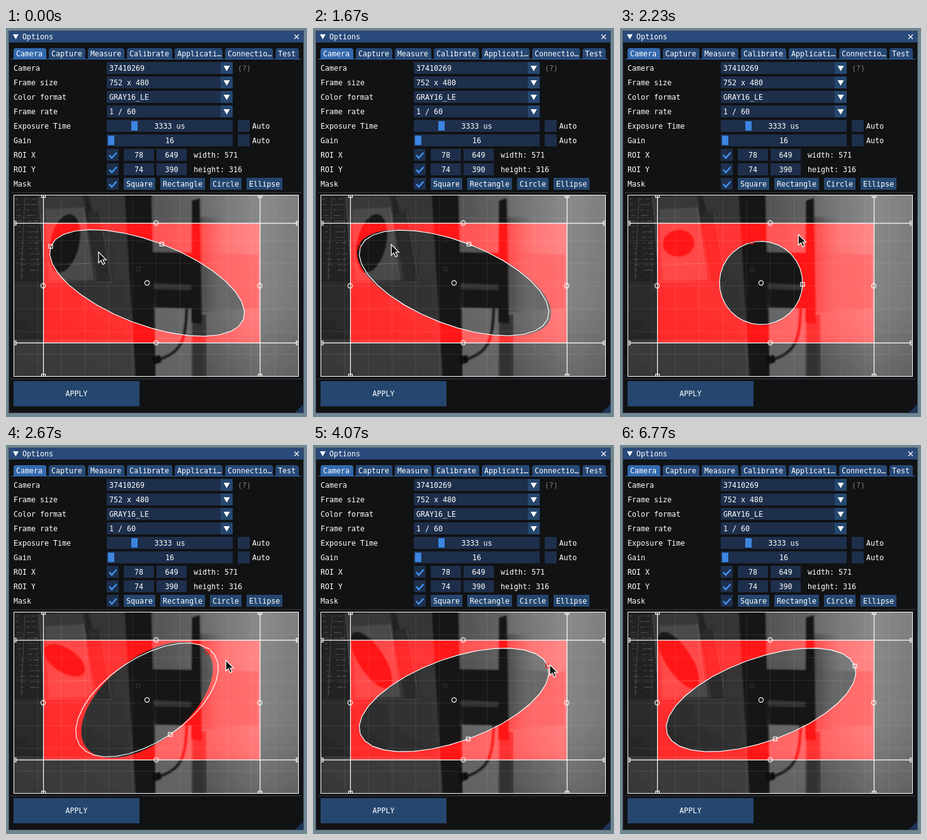
Recreate the animation shown at these times as an HTML page. Size 478x618 px, loop 6.81 s.

```html
<!DOCTYPE html>
<html lang="en">
<head>
<meta charset="utf-8">
<title>Options</title>
<style>
html, body { margin: 0; width: 100%; height: 100%; overflow: hidden; background: #6f8793; }
svg { display: block; }
text { font: 11.63px "DejaVu Sans Mono", "Liberation Mono", monospace; fill: #fff; white-space: pre; }
</style>
</head>
<body>
<svg id="stage" width="478" height="618" viewBox="0 0 478 618">
  <defs>
    <clipPath id="view"><rect x="13" y="266" width="451" height="287"/></clipPath>
    <filter id="soft" x="-5%" y="-5%" width="110%" height="110%"><feGaussianBlur stdDeviation="1.1"/></filter>
    <linearGradient id="wall">
      <stop offset="0" stop-color="#2c2c2c"/><stop offset=".4" stop-color="#373737"/>
      <stop offset=".49" stop-color="#555"/><stop offset=".64" stop-color="#646464"/>
      <stop offset=".67" stop-color="#707070"/><stop offset=".85" stop-color="#8c8c8c"/>
      <stop offset="1" stop-color="#7c7c7c"/>
    </linearGradient>
    <linearGradient id="shade" x2="0" y2="1">
      <stop offset="0" stop-opacity="0"/><stop offset=".6" stop-opacity=".06"/><stop offset="1" stop-opacity=".25"/>
    </linearGradient>
    <linearGradient id="shadow">
      <stop offset="0" stop-color="#3c3c3c"/><stop offset="1" stop-color="#6e6e6e" stop-opacity=".4"/>
    </linearGradient>
  </defs>
  <g id="ui"></g>
  <g id="camera" clip-path="url(#view)" style="isolation:isolate">
    <g id="photo" filter="url(#soft)"></g>
    <g id="details"></g>
    <path id="tint" fill="#f00" fill-rule="evenodd" style="mix-blend-mode:screen"/>
    <g id="guides" fill="none" stroke="#fff"></g>
    <path id="outline" fill="none" stroke="#fff" stroke-width="1.2"/>
    <g id="handles" fill="none" stroke="#fff" stroke-width="1.2"></g>
  </g>
  <path id="cursor" d="M0 0V17L4 13.2L6.8 19.6L9.8 18.3L7 12.2H12.2Z" fill="#111" stroke="#fff" stroke-width="1.2"/>
</svg>
<script>
const $ = id => document.getElementById(id);

function add(parent, tag, attrs) {
  const node = document.createElementNS("http://www.w3.org/2000/svg", tag);
  for (const key in attrs) node.setAttribute(key, attrs[key]);
  parent.appendChild(node);
  return node;
}

const ui = $("ui");
const FRAME = "#1d2f4b", BUTTON = "#25476f", ACCENT = "#4296fa";
const ROI = { left: 59.5, right: 403.5, top: 310.1, bottom: 500.4 };

const rect = (x, y, width, height, fill, parent = ui) => add(parent, "rect", { x, y, width, height, fill });
const path = (d, attrs, parent = ui) => add(parent, "path", { d, ...attrs });

function label(value, x, y, attrs = {}) {
  add(ui, "text", { x, y: y + 4, ...attrs }).textContent = value;
}
const centered = (value, x, y) => label(value, x, y, { "text-anchor": "middle" });

function button(value, x, y, width, height, fill = BUTTON) {
  rect(x, y - Math.ceil(height / 2), width, height, fill);
  centered(value, x + width / 2, y);
}

function checkbox(x, y, checked) {
  rect(x, y - 10, 19, 19, FRAME);
  if (checked) path(`M${x + 4} ${y}l4 4.5l7.5-8.5`, { fill: "none", stroke: ACCENT, "stroke-width": 2.4 });
}

function slider(value, y, grabX, grabWidth) {
  button(value, 160, y, 200, 19, FRAME);
  rect(grabX, y - 8, grabWidth, 15, "#3d85e0");
  checkbox(368, y, false);
  label("Auto", 391, y);
}

function buildPanel() {
  rect(4, 4, 469, 608, "#434a55");
  rect(5, 5, 467, 606, "#111214");
  rect(5, 5, 467, 18, "#294a7a");
  path("M11 10h9l-4.5 8z", { fill: "#fff" });
  label("Options", 26, 14);
  path("M458 10.5l7 7m0-7l-7 7", { stroke: "#fff", "stroke-width": 1.2 });

  const tabs = [["Camera", 12, 52], ["Capture", 68, 58], ["Measure", 130, 58], ["Calibrate", 192, 72],
    ["Applicati…", 268, 76], ["Connectio…", 348, 76], ["Test", 428, 37]];
  tabs.forEach(([name, x, w], i) => {
    path(`M${x} 49v-13q0-4 4-4h${w - 8}q4 0 4 4v13z`, { fill: i ? "#264875" : "#3369ad" });
    label(name, x + 4, 41);
  });
  rect(8, 49, 461, 1, "#3369ad");

  const rowY = i => 64 + 23 * i;
  ["Camera", "Frame size", "Color format", "Frame rate", "Exposure Time", "Gain", "ROI X", "ROI Y", "Mask"]
    .forEach((name, i) => label(name, 12, rowY(i)));
  ["37410269", "752 x 480", "GRAY16_LE", "1 / 60"].forEach((value, i) => {
    const y = rowY(i);
    rect(160, y - 10, 181, 19, FRAME);
    rect(341, y - 10, 19, 19, BUTTON);
    path(`M345.5 ${y - 4}h10l-5 8.5z`, { fill: "#fff" });
    label(value, 164, y);
  });
  label("(?)", 368, 64, { style: "fill:#808080" });

  slider("3333 us", rowY(4), 199, 10);
  slider("16", rowY(5), 162, 10);
  [["78", "649", "width: 571"], ["74", "390", "height: 316"]].forEach(([from, to, size], i) => {
    const y = rowY(6 + i);
    checkbox(160, y, true);
    button(from, 187, y, 48, 19, FRAME);
    button(to, 239, y, 48, 19, FRAME);
    label(size, 298, y);
  });
  checkbox(160, rowY(8), true);
  [["Square", 187, 50], ["Rectangle", 245, 71], ["Circle", 324, 50], ["Ellipse", 382, 57]]
    .forEach(([name, x, w]) => button(name, x, rowY(8), w, 19));

  rect(8, 261, 461, 1, "#3c3c44");
  rect(8, 557, 461, 1, "#3c3c44");
  rect(12, 265, 453, 289, "#fff");
  button("APPLY", 12, 581, 200, 40);
  path("M472 598v13h-13z", { fill: "#1c3558" });
}

function buildPhoto() {
  const photo = $("photo"), details = $("details");
  const shape = (d, fill, opacity = 1) => path(d, { fill, opacity }, photo);
  rect(5, 258, 470, 303, "url(#wall)", photo);
  rect(5, 258, 470, 303, "url(#shade)", photo);
  shape("M5 495H206V561H5Z", "#484848", .6);

  // Monitor on the left, seen at an angle
  shape("M5 258H128L170 405L5 403Z", "#222");
  shape("M52 268L122 266L145 402L62 404Z", "#383838");
  shape("M62 288L123 285L137 400L68 402Z", "#484848");
  shape("M130 294L150 292L170 405L146 405Z", "#2a2a2a");

  // Frame post, bracket, rail and cable
  shape("M188 258H231L238 561H206Z", "#181818");
  shape("M238 446H294V561H238Z", "#707070", .7);
  shape("M310 357L400 360V446L318 450Z", "#626262", .6);
  shape("M309 300H345V452H309Z", "url(#shadow)", .7);
  shape("M232 356L297 357V446L236 444Z", "#161616");
  shape("M234 405L297 408V417L235 415Z", "#303030");
  shape("M296 455H318V561H296Z", "#2c2c2c", .85);
  shape("M295 274L308 270L311 470L294 468Z", "#161616");
  path("M287 446C285 500 278 515 240 528", { fill: "none", stroke: "#1c1c1c", "stroke-width": 5 }, photo);
  shape("M231 522l14-3l2 12l-13 5z", "#101010");

  let seed = 7;
  const random = () => (seed = seed * 16807 % 2147483647) / 2147483647;
  for (let i = 0; i < 44; i++) {
    const column = i % 3, y = 272 + Math.floor(i / 3) * 8.7;
    const x = [15, 31, 40][column] + (y - 270) * .07;
    path(`M${x} ${y}l${3 + random() * 6} -.5`, { stroke: "#aaa", opacity: .2 + random() * .3 }, details);
  }
  path("M52 269L62 404M30 270L24 400M62 377L134 374M122 284L138 402M62 404H168L149 293",
    { fill: "none", stroke: "#999", "stroke-width": .8, opacity: .4 }, details);
  path("M207 380h6v6h-6zM207 316h7M208 340h6M192 460h7M192 468h8", { fill: "none", stroke: "#555", opacity: .5 }, details);

  return path("", { fill: "#101010", opacity: .92 }, photo);
}

function buildGuides() {
  const guides = $("guides"), handles = $("handles");
  let grid = "";
  for (let i = 1; i < 12; i++) grid += `M${12.5 + i * 37.7} 266V553`;
  for (let i = 1; i < 8; i++) grid += `M13 ${265.5 + i * 36.1}H464`;
  path(grid, { opacity: .09 }, guides);

  const columns = [ROI.left, ROI.right], rows = [ROI.top, ROI.bottom];
  const corner = (x, y) => add(handles, "rect", { x: x - 3, y: y - 3, width: 6, height: 6 });
  const dot = (cx, cy) => add(handles, "circle", { cx, cy, r: 3.6 });
  for (const x of columns) {
    path(`M${x} 266V553`, { "stroke-width": 1.2 }, guides);
    corner(x, 266);
    corner(x, 553);
    dot(x - .5, 409.5);
  }
  for (const y of rows) {
    path(`M13 ${y}H464`, { "stroke-width": 1.2 }, guides);
    corner(13, y);
    corner(464, y);
    dot(238.5, y - .3);
  }
  dot(224, 405);
  return [corner(0, 0), corner(0, 0)];
}

buildPanel();
const reflection = buildPhoto();
const [longHandle, shortHandle] = buildGuides();

const LOOP = 6810, CENTER = [224, 405], SHORT_AXIS = 66;
const DRAG_START = 1400, DRAG_END = 3000;
const LAG = { outline: 200, mask: 260, reflection: 380 };

// time, x, y of the pointer
const POINTER = [
  [0, 147, 356], [250, 147, 356], [950, 71, 347], [1400, 71, 347], [1470, 75, 348],
  [1670, 124, 344], [2030, 226, 339], [2230, 283, 328], [2400, 318, 328], [2470, 331, 333],
  [2670, 349, 342], [3000, 373, 351], [3400, 376, 349]
];
const POINTER_GONE = 4880;

function pointerAt(t) {
  const next = POINTER.findIndex(key => key[0] > t);
  if (next < 0) return POINTER[POINTER.length - 1].slice(1);
  const [t0, x0, y0] = POINTER[next - 1], [t1, x1, y1] = POINTER[next];
  const k = (t - t0) / (t1 - t0);
  return [x0 + (x1 - x0) * k, y0 + (y1 - y0) * k];
}

// Half axes of the ellipse: the dragged one and its perpendicular
function axesAt(t) {
  const [x, y] = pointerAt(Math.min(Math.max(t, DRAG_START), DRAG_END));
  const a = [x - CENTER[0], y - CENTER[1]];
  const scale = SHORT_AXIS / Math.hypot(...a);
  return [a, [-a[1] * scale, a[0] * scale]];
}

const toView = (x, y) => [CENTER[0] + x, CENTER[1] + y];
const toReflection = (x, y) => [93 - y * .34 + x * .055, 342 + x * .3];

function ellipsePath([a, b], project, segments = 32) {
  const points = Array.from({ length: segments }, (_, i) => {
    const angle = i * 2 * Math.PI / segments, c = Math.cos(angle), s = Math.sin(angle);
    return project(a[0] * c + b[0] * s, a[1] * c + b[1] * s).map(n => n.toFixed(2)).join(" ");
  });
  return `M${points.join("L")}Z`;
}

function placeHandle(node, [x, y]) {
  node.setAttribute("x", x - 3);
  node.setAttribute("y", y - 3);
}

const roiPath = `M${ROI.left} ${ROI.top}H${ROI.right}V${ROI.bottom}H${ROI.left}Z`;

function render(t) {
  const current = axesAt(t - LAG.outline), masked = axesAt(t - LAG.mask);
  $("outline").setAttribute("d", ellipsePath(current, toView));
  $("tint").setAttribute("d", roiPath + ellipsePath(masked, toView, 72));
  reflection.setAttribute("d", ellipsePath(axesAt(t - LAG.reflection), toReflection));

  const hovered = t > 950 && t < POINTER_GONE;
  longHandle.setAttribute("stroke", hovered ? "#f01818" : "#fff");
  placeHandle(longHandle, toView(...masked[0]));
  placeHandle(shortHandle, toView(...current[1]));

  const [x, y] = pointerAt(t);
  $("cursor").setAttribute("transform", `translate(${x} ${y})`);
  $("cursor").setAttribute("visibility", t < POINTER_GONE ? "visible" : "hidden");
}

const start = performance.now();
function tick() {
  render((performance.now() - start) % LOOP);
  requestAnimationFrame(tick);
}
tick();
</script>
</body>
</html>
```
